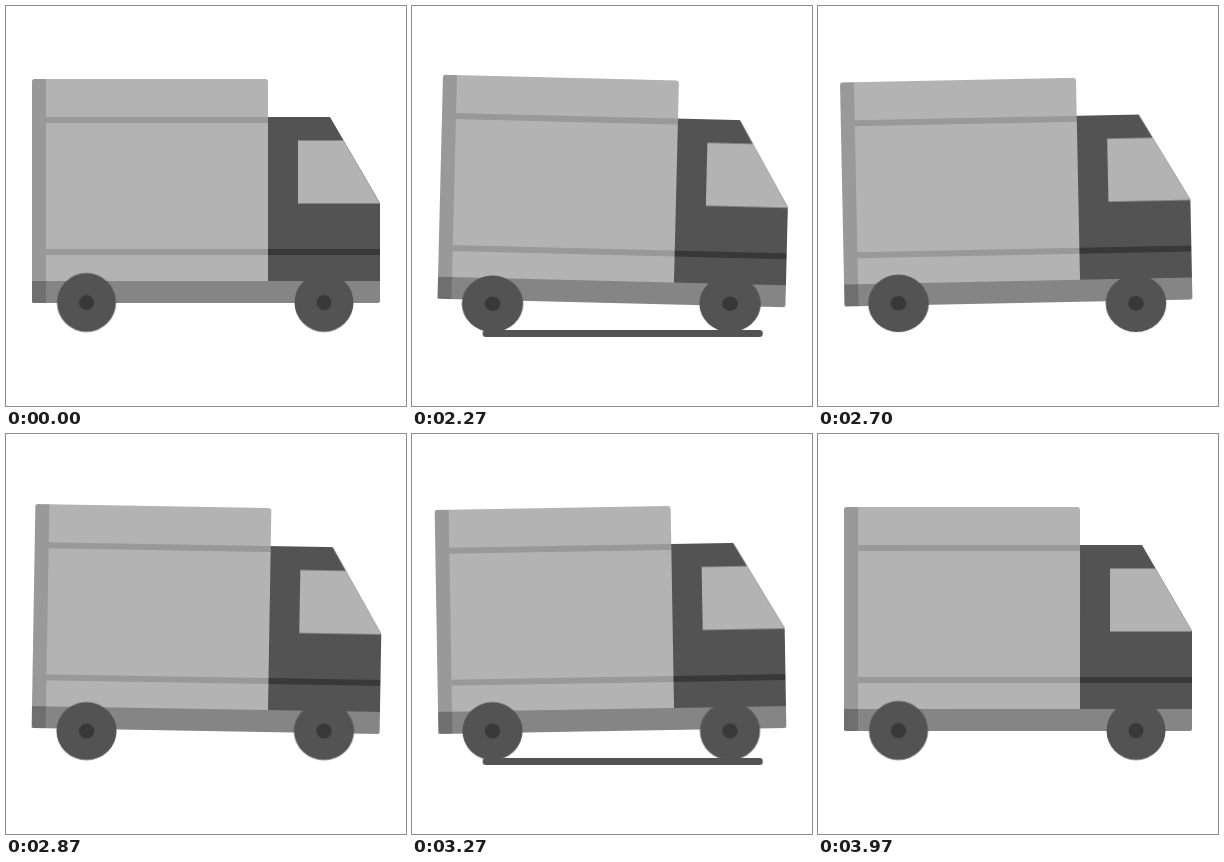
Write an HTML page that moves like this. It is 400x400 px and loops after 4020 ms.

```html
<!DOCTYPE html>
<html lang="en">
<head>
<meta charset="utf-8">
<title>Truck</title>
<style>
  html, body { margin: 0; width: 100%; height: 100%; overflow: hidden; background: #fff; }
  svg { display: block; width: 100%; height: 100%; }

  .body, .wheel, .road { animation: 4020ms infinite; }

  /* Sine easing between the extremes of each swing */
  .body, .wheel { animation-timing-function: cubic-bezier(.37, 0, .63, 1); }
  .body { animation-name: rock; transform-origin: 200px 274px; }
  .wheel { animation-name: squash; transform-origin: 0 29.5px; }
  .road { animation-name: pass; }

  @keyframes rock {
    0%, 49.751% { transform: rotate(0deg); }
    54.602%, 74.502%, 94.403% { transform: rotate(1.7deg); }
    64.552%, 84.453% { transform: rotate(-1.7deg); }
    99.005%, 100% { transform: rotate(0deg); }
  }

  @keyframes squash {
    0%, 49.751%, 59.577%, 69.527%, 79.478%, 89.428%, 99.005%, 100% { transform: scale(1, 1); }
    54.602%, 64.552%, 74.502%, 84.453%, 94.403% { transform: scale(1.06, .94); }
  }

  /* The road line crosses twice, slowing a little on the way */
  @keyframes pass {
    0% { transform: translateX(433px); animation-timing-function: step-end; }
    50.995%, 75.871% {
      transform: translateX(433px);
      animation-timing-function: cubic-bezier(.333, .427, .667, .76);
    }
    63.93%, 88.806% { transform: translateX(-301px); animation-timing-function: step-end; }
    100% { transform: translateX(-301px); }
  }
</style>
</head>
<body>
<svg viewBox="0 0 400 400">
  <defs>
    <g id="tyre">
      <circle r="29.5" fill="#535353"/>
      <circle r="7.5" fill="#383838"/>
    </g>
  </defs>

  <rect class="road" y="324" width="280" height="7" rx="3" fill="#535353"/>

  <g class="body">
    <!-- chassis -->
    <path d="M26 274H374V295Q374 297 372 297H28Q26 297 26 295Z" fill="#858585"/>
    <path d="M26 274H40V297H28Q26 297 26 295Z" fill="#6f6f6f"/>
    <!-- cargo box -->
    <path d="M26 275V76Q26 73 29 73H259Q262 73 262 76V275Z" fill="#b3b3b3"/>
    <path d="M26 275V76Q26 73 29 73H40V111H262V117H40V243H262V249H40V275Z" fill="#999"/>
    <!-- cab -->
    <path d="M262 111H324L374 197V275H262Z" fill="#535353"/>
    <path d="M262 243H374V249H262Z" fill="#383838"/>
    <path d="M292 134.5H337.5L374 197.5H292Z" fill="#b3b3b3"/>
  </g>

  <g transform="translate(80.5 296.5)"><use class="wheel" href="#tyre"/></g>
  <g transform="translate(318 296.5)"><use class="wheel" href="#tyre"/></g>
</svg>
</body>
</html>
```
